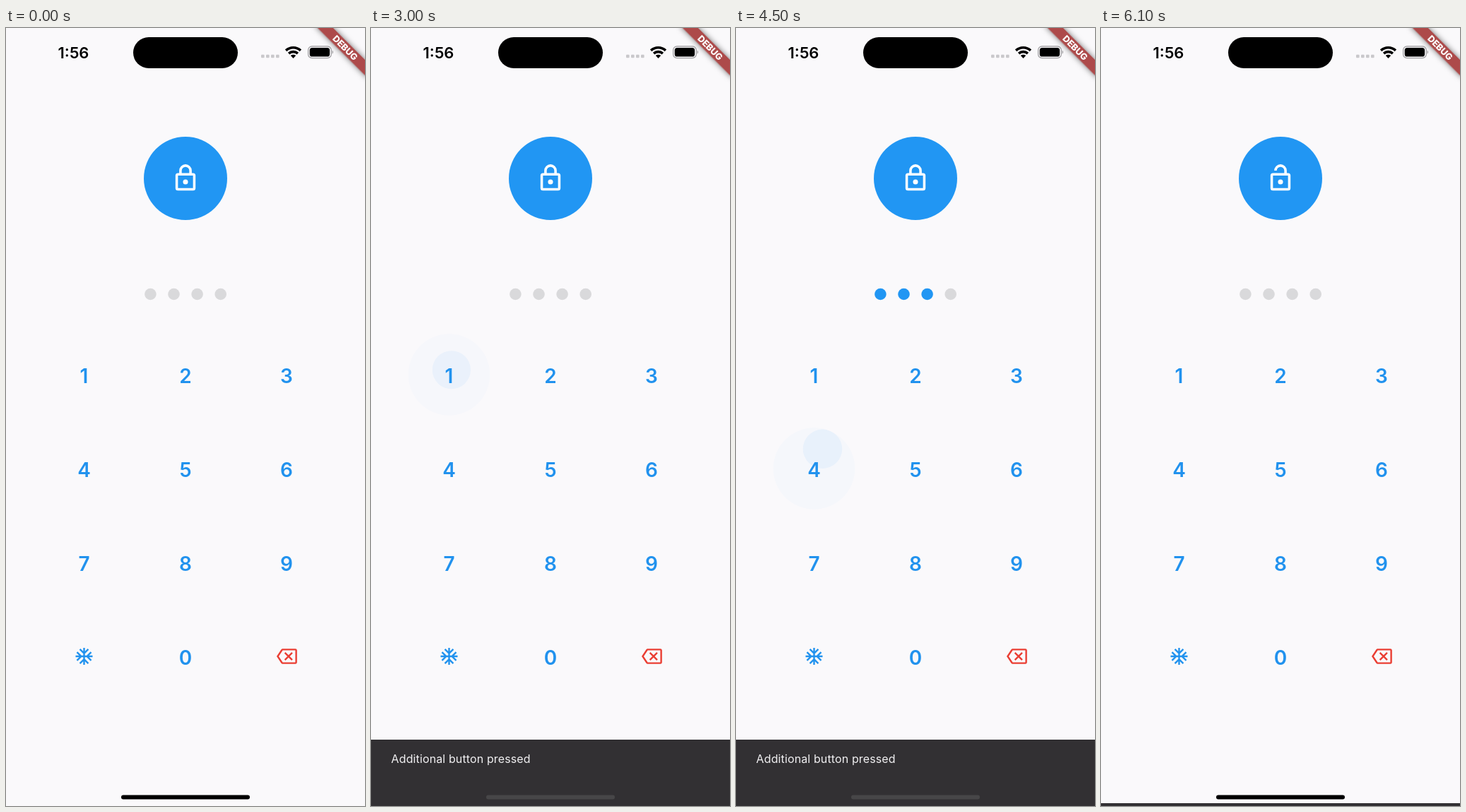
Recreate the animation shown at these times as an HTML page. Size 508x1102 px, loop 6200 ms.

```html
<!DOCTYPE html>
<html lang="en">
<head>
<meta charset="utf-8">
<title>PIN pad</title>
<style>
  html, body { margin: 0; height: 100%; overflow: hidden; background: #faf9fb; }
  svg { display: block; width: 100%; height: 100vh; font-family: Inter, "Liberation Sans", sans-serif; }
  .mid { text-anchor: middle; }
  .key { font-size: 28px; font-weight: 600; }
  .blue, .key { fill: #2192ee; }
  .dot { fill: #d9d9db; }
  .dot.on { fill: #2196f3; }
  .line { fill: none; stroke-width: 2; }
  .band { filter: drop-shadow(0 0 4px rgba(0, 0, 0, .55)); }
</style>
</head>
<body>
<svg viewBox="0 0 508 1102">
  <defs>
    <path id="arm" d="M0 0V-10M-4.95-8.36 0-3.41 4.95-8.36"/>
  </defs>
  <rect width="508" height="1102" fill="#faf9fb"/>

  <!-- status bar -->
  <text class="mid" x="95.5" y="43" font-size="22" font-weight="600">1:56</text>
  <rect x="180" y="13" width="148" height="44" rx="22"/>
  <g fill="#c9c8cb">
    <rect x="361" y="37.8" width="4.6" height="4.4" rx="1"/>
    <rect x="368" y="37.8" width="4.6" height="4.4" rx="1"/>
    <rect x="375" y="37.8" width="4.6" height="4.4" rx="1"/>
    <rect x="382" y="37.8" width="4.6" height="4.4" rx="1"/>
  </g>
  <g fill="none" stroke="#000" stroke-width="3.6">
    <path d="M396.1 31.9a15.2 15.2 0 0 1 20.8 0"/>
    <path d="M400.1 36.1a9.4 9.4 0 0 1 12.8 0"/>
  </g>
  <path d="M406.5 43l-3.7-3.9a5.4 5.4 0 0 1 7.4 0z"/>
  <rect x="427.6" y="26" width="32.6" height="16.6" rx="5.4" fill="none" stroke="#a2a1a4" stroke-width="1.3"/>
  <rect x="429.7" y="28.1" width="28.4" height="12.4" rx="3.6"/>
  <path d="M461.6 31.6q3 2.7 0 5.4z" fill="#a2a1a4"/>

  <!-- lock -->
  <circle cx="254" cy="213" r="59" fill="#2196f3"/>
  <g transform="translate(232.7 191.3) scale(1.775)" class="line" stroke="#fff">
    <rect x="5" y="9" width="14" height="12" rx="1"/>
    <path id="shackle"/>
    <circle cx="12" cy="15" r="2" fill="#fff" stroke="none"/>
  </g>

  <g id="dots"></g>
  <g id="inks"></g>
  <g id="keys"></g>

  <g transform="translate(110.5 890) scale(1.2)" class="line" stroke="#2192ee">
    <use href="#arm"/>
    <use href="#arm" transform="rotate(90)"/>
    <use href="#arm" transform="rotate(180)"/>
    <use href="#arm" transform="rotate(270)"/>
  </g>
  <g transform="translate(383 875.6) scale(1.2)" class="line" stroke="#ea3e33">
    <path d="M7 4H22a1 1 0 0 1 1 1V19a1 1 0 0 1-1 1H7q-.5 0-.8-.5L1.2 12l5-7.5Q6.5 4 7 4z"/>
    <path d="M9.7 7.7l8.6 8.6M18.3 7.7l-8.6 8.6"/>
  </g>

  <g id="snack">
    <rect width="508" height="110" fill="#323033"/>
    <text id="note" x="28.6" y="32.5" font-size="16" letter-spacing=".12" fill="#f1f0f2">Additional button pressed</text>
  </g>
  <rect id="home" x="163" y="1086.6" width="182" height="5.8" rx="2.9"/>

  <g transform="translate(508 0) rotate(45)">
    <rect class="band" x="-51.7" y="31.9" width="103.4" height="15.5" fill="#ad4a4a"/>
    <text class="mid" y="44.2" font-size="12.7" font-weight="800" fill="#fff">DEBUG</text>
  </g>
</svg>
<script>
const LOOP = 6200, STEP = 100, SNACK = 94, KEY_R = 58;
const COLS = [110.5, 254, 397], ROW0 = 491, ROW_GAP = 133;
const UNLOCK = 4800, SNACK_IN = 1584, SNACK_OUT = 5882;
const LOCKED = "M8 9V6a4 4 0 0 1 8 0v3", OPEN = "M8 6a4 4 0 0 1 8 0v3";

// key position, touch point, press time, hold time
const presses = [
  { col: 0, row: 3, x: 108, y: 888, at: 1601, hold: 4 },
  { col: 0, row: 0, x: 114, y: 484, at: 2950, hold: 90, digit: true },
  { col: 1, row: 0, x: 236, y: 480, at: 3360, hold: 100, digit: true },
  { col: 2, row: 0, x: 390, y: 482, at: 3950, hold: 100, digit: true },
  { col: 0, row: 1, x: 123, y: 595, at: 4440, hold: 100, digit: true }
];

const $ = id => document.getElementById(id);
const clamp = v => Math.min(1, Math.max(0, v));
const mix = (a, b, k) => a + (b - a) * k;
const rowY = row => ROW0 + row * ROW_GAP;

function add(parent, tag, attrs) {
  const el = document.createElementNS("http://www.w3.org/2000/svg", tag);
  set(el, attrs);
  return parent.appendChild(el);
}
function set(el, attrs) {
  for (const name in attrs) el.setAttribute(name, attrs[name]);
}

function bezier(x1, y1, x2, y2) {
  const at = (a, b, s) => 3 * a * s * (1 - s) ** 2 + 3 * b * s * s * (1 - s) + s ** 3;
  return x => {
    if (x <= 0 || x >= 1) return clamp(x);
    let lo = 0, hi = 1;
    for (let i = 0; i < 24; i++) {
      const s = (lo + hi) / 2;
      if (at(x1, x2, s) < x) lo = s; else hi = s;
    }
    return at(y1, y2, lo);
  };
}
const ease = bezier(.25, .1, .25, 1);
const fastOutSlowIn = bezier(.4, 0, .2, 1);

[..."123456789"].forEach((n, i) => addKey(n, i % 3, Math.floor(i / 3)));
addKey("0", 1, 3);
function addKey(n, col, row) {
  add($("keys"), "text", { class: "key mid", x: COLS[col], y: rowY(row) + 12 }).textContent = n;
}

const dots = [0, 1, 2, 3].map(i =>
  add($("dots"), "circle", { cx: 204.4 + 33.1 * i, cy: 377, r: 8.3 }));

presses.forEach((p, i) => {
  p.cx = COLS[p.col];
  p.cy = rowY(p.row);
  const disc = { cx: p.cx, cy: p.cy, r: KEY_R };
  add(add($("inks"), "clipPath", { id: "clip" + i }), "circle", disc);
  const g = add($("inks"), "g", { "clip-path": `url(#clip${i})`, fill: "#2196f3" });
  p.glow = add(g, "circle", disc);
  p.splash = add(g, "circle", {});
});

function drawInk(p, t) {
  const age = t - p.at, since = age - p.hold;
  // slow spread while held, quick spread after release
  const held = clamp(Math.min(age, p.hold) / 1000);
  const k = ease(clamp(held + Math.max(0, since) / 225));
  const fade = 1 - clamp((since / 375 - .6) / .4);
  set(p.glow, { opacity: .06 * clamp(Math.min(age, 200 - age) / 200) });
  set(p.splash, {
    cx: mix(p.x, p.cx, k), cy: mix(p.y, p.cy, k), r: mix(25, 88, k),
    opacity: .08 * clamp(age / 75) * fade
  });
}

function draw(t) {
  presses.forEach(p => drawInk(p, t));

  const open = t >= UNLOCK;
  const typed = open ? 0 : presses.filter(p => p.digit && t >= p.at + p.hold).length;
  dots.forEach((d, i) => set(d, { class: i < typed ? "dot on" : "dot" }));
  set($("shackle"), { d: open ? OPEN : LOCKED });

  const leaving = t >= SNACK_OUT;
  const k = clamp(leaving ? 1 - (t - SNACK_OUT) / 250 : (t - SNACK_IN) / 250);
  const h = Math.floor(SNACK * fastOutSlowIn(k));
  set($("snack"), { transform: `translate(0 ${1102 - h})`, visibility: h ? "visible" : "hidden" });
  set($("note"), { opacity: leaving ? 1 : fastOutSlowIn(clamp((k - .72) / .28)) });
  set($("home"), { fill: h > 40 ? "#474648" : "#000" });
}

const start = performance.now();
function tick() {
  const t = (performance.now() - start) % LOOP;
  draw(Math.floor(t / STEP) * STEP);
  requestAnimationFrame(tick);
}
tick();
</script>
</body>
</html>
```
